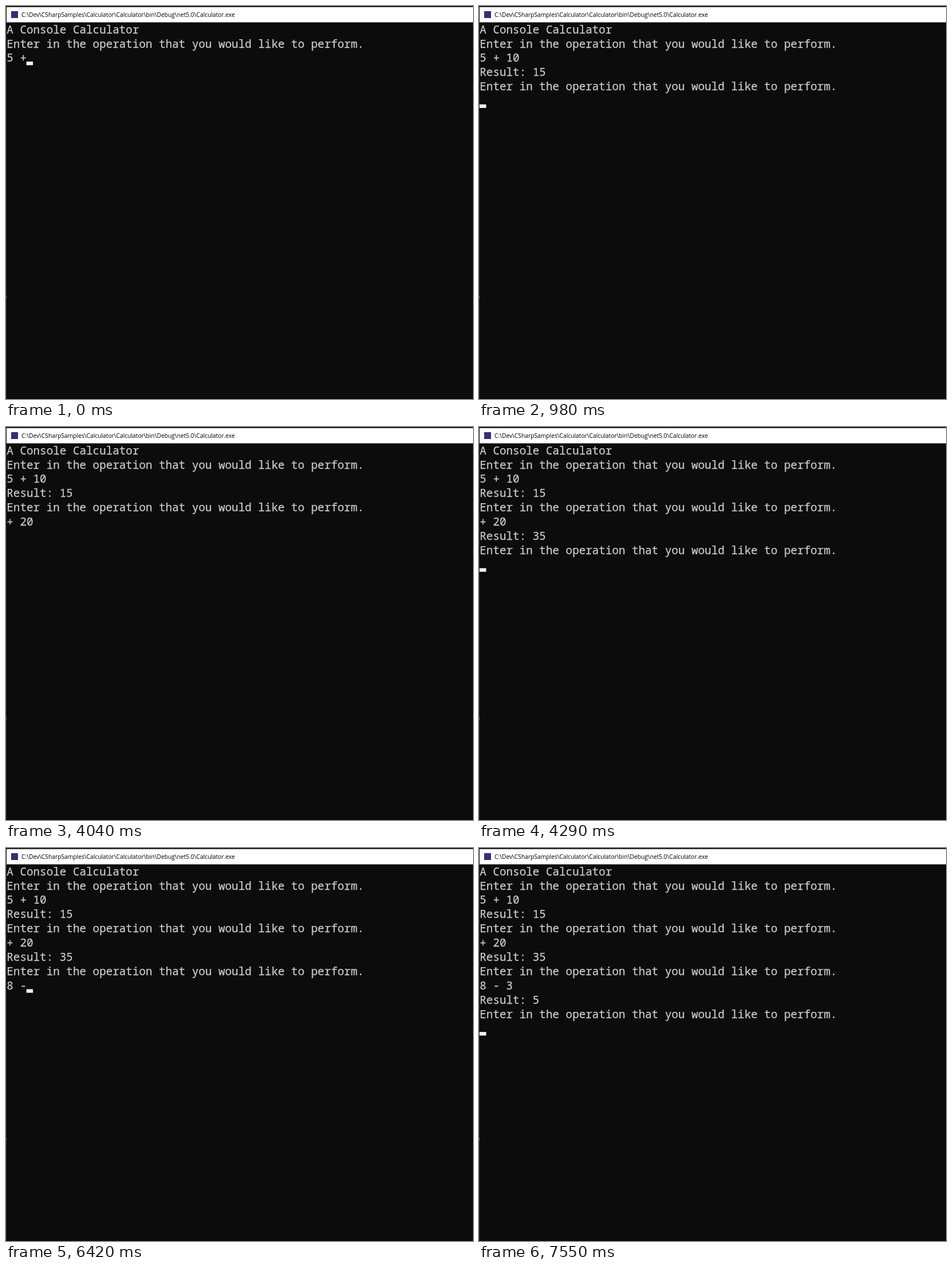
An HTML page for the animation above (8000 ms loop, 816 by 686 pixels).

```html
<!DOCTYPE html>
<html lang="en">
<head>
<meta charset="utf-8">
<title>Console calculator</title>
<style>
  html, body { margin: 0; width: 100%; height: 100%; overflow: hidden; background: #0c0c0c; }
  svg { display: block; }
  text { white-space: pre; }
  .title { font: 10.25px "Open Sans", "Noto Sans", sans-serif; fill: #000; }
  .line { font: 19.27px "Noto Sans Mono", "DejaVu Sans Mono", monospace; fill: #ccc; stroke: #ccc; stroke-width: 0.25px; }
</style>
</head>
<body>
<svg id="stage" width="816" height="686" viewBox="0 0 816 686">
  <rect width="816" height="686" fill="#0c0c0c"/>
  <rect width="816" height="2" fill="#1f1f24"/>
  <rect y="28" width="1" height="658" fill="#2a2a2a"/>
  <rect y="506" width="1" height="5" fill="#777"/>
  <rect x="1" y="2" width="815" height="26.5" fill="#fff"/>
  <rect x="9" y="9" width="12" height="12" fill="#3f2a74"/>
  <text class="title" x="27" y="18.7">C:\Dev\CSharpSamples\Calculator\Calculator\bin\Debug\net5.0\Calculator.exe</text>
  <g id="lines"></g>
  <rect id="cursor" width="11.5" height="6.3" fill="#f2f2f2"/>
</svg>
<script>
const LOOP = 8000, LEFT = 1, COL = 11.55, ROW = 24.9, BASE = 47.6, ROWS = 12;
const PROMPT = "Enter in the operation that you would like to perform.\n";
const first = "A Console Calculator\n" + PROMPT;
const second = first + "5 + 10\nResult: 15\n" + PROMPT;
const third = second + "+ 20\nResult: 35\n" + PROMPT;
const last = third + "8 - 3\nResult: 5\n" + PROMPT;

// start time, screen text, cursor visible (always at the end of the text)
const states = [
  [0, first + "5 +", true],
  [130, first + "5 + ", true],
  [280, first + "5 + ", false],
  [560, first + "5 + 1", true],
  [710, first + "5 + 10", true],
  [860, first + "5 + 10", false],
  [980, second, true],
  [1880, second, false],
  [2340, second, true],
  [2870, second + "+", false],
  [3120, second + "+ ", true],
  [3390, second + "+ ", false],
  [3640, second + "+ 20", true],
  [4040, second + "+ 20", false],
  [4290, third, true],
  [5000, third, false],
  [5580, third + "8", false],
  [5860, third + "8 ", true],
  [6010, third + "8 ", false],
  [6420, third + "8 -", true],
  [6540, third + "8 -", false],
  [6820, third + "8 - 3", true],
  [7120, third + "8 - 3", false],
  [7550, last, true]
];

const group = document.getElementById("lines");
const cursor = document.getElementById("cursor");
const lines = Array.from({ length: ROWS }, (_, row) => {
  const line = document.createElementNS("http://www.w3.org/2000/svg", "text");
  line.setAttribute("class", "line");
  line.setAttribute("x", LEFT + 0.3);
  line.setAttribute("y", BASE + row * ROW);
  return group.appendChild(line);
});

let shown = null;
function draw(time) {
  const state = states.findLast(([start]) => start <= time);
  if (state === shown) return;
  shown = state;
  const [, text, visible] = state;
  const rows = text.split("\n");
  lines.forEach((line, i) => { line.textContent = rows[i] || ""; });
  const end = rows.length - 1;
  cursor.setAttribute("x", LEFT + rows[end].length * COL);
  cursor.setAttribute("y", BASE - 0.4 + end * ROW);
  cursor.setAttribute("visibility", visible ? "visible" : "hidden");
}

const begin = performance.now();
function tick() {
  draw((performance.now() - begin) % LOOP);
  requestAnimationFrame(tick);
}
tick();
</script>
</body>
</html>
```
